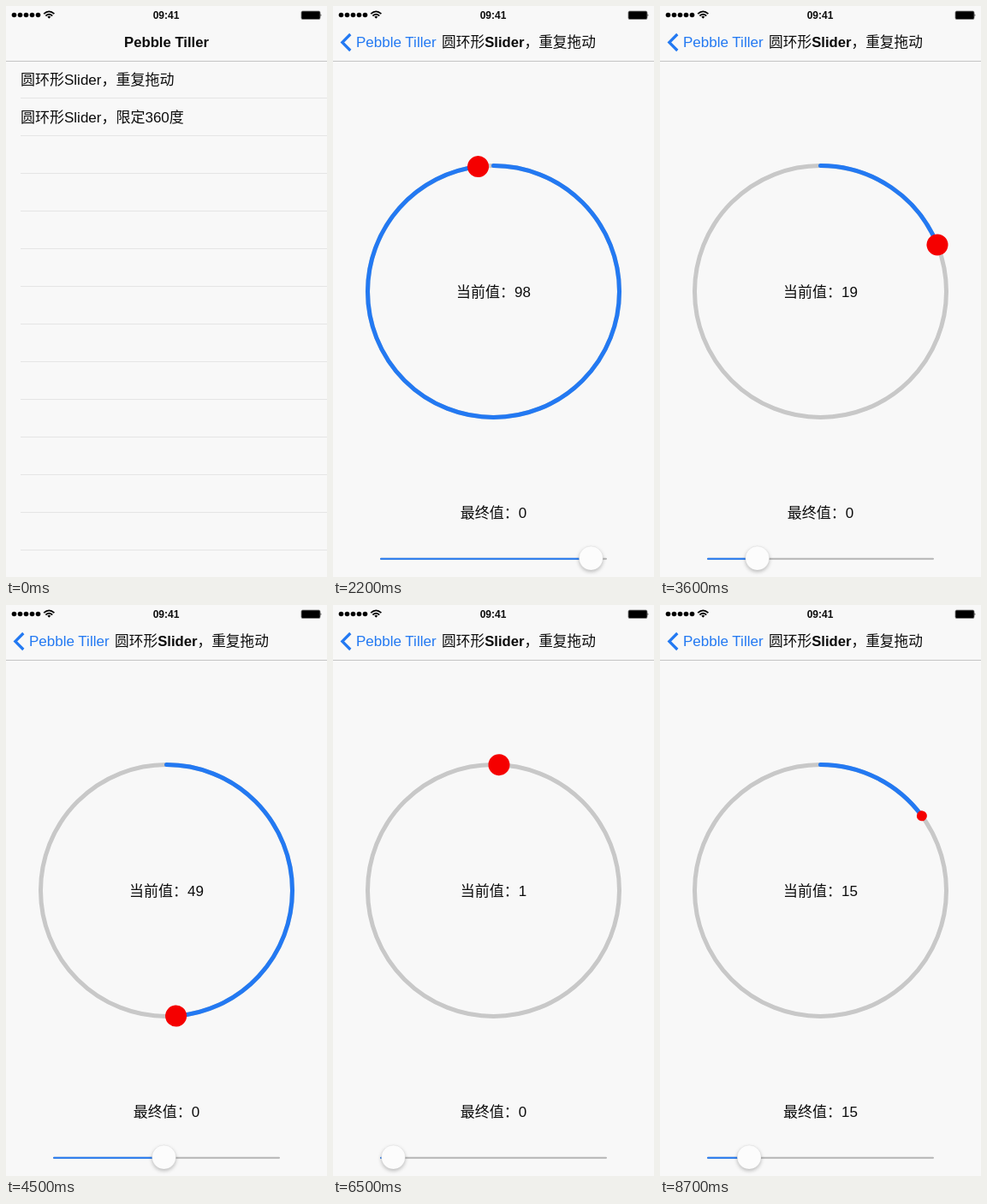
These frames come from a looping animation (375 px wide and 667 px high, 8800 ms). An HTML page:

```html
<!DOCTYPE html>
<html lang="zh-CN">
<head>
<meta charset="utf-8">
<title>Pebble Tiller</title>
<style>
  html, body { margin: 0; width: 100%; height: 100%; overflow: hidden; background: #f8f8f8; }
  svg { display: block; width: 375px; height: 667px; }
  text { font: 17px "Liberation Sans", "Noto Sans CJK SC", "Noto Sans CJK", sans-serif; fill: #0c0c0c; }
  .mid { text-anchor: middle; }
  .title { font-size: 16.7px; font-weight: 500; }
  .bold { font-weight: bold; }
  .clock { font-size: 12px; font-weight: bold; }
  .bg { fill: #f8f8f8; }
  .line { fill: none; stroke-linecap: round; }
  .blue { stroke: #2379f2; }
  .grey { stroke: #c8c8c8; }
  #backLabel { fill: #2379f2; }
  #thumb { fill: #fcfcfc; stroke: rgba(0,0,0,.06); filter: drop-shadow(0 2px 2px rgba(0,0,0,.24)); }
</style>
</head>
<body>
<svg viewBox="0 0 375 667">
  <rect class="bg" width="375" height="667"/>

  <g id="list">
    <rect id="highlight" y="64" width="375" height="44" fill="#d9d9d9"/>
    <g id="rules" stroke="#e5e5e5"></g>
    <text x="17" y="92">圆环形Slider，重复拖动</text>
    <text x="17" y="136">圆环形Slider，限定360度</text>
  </g>
  <rect id="dim" width="375" height="667"/>

  <g id="detail">
    <rect class="bg" width="375" height="667"/>
    <circle class="line grey" cx="187.5" cy="333.5" r="147" stroke-width="5"/>
    <circle id="arc" class="line blue" cx="187.5" cy="333.5" r="147" stroke-width="5"
            pathLength="100" transform="rotate(-90 187.5 333.5)"/>
    <circle id="knob" cx="187.5" cy="186.5" fill="#f50000"/>
    <text id="current" class="mid" x="187.5" y="339.5"></text>
    <text id="final" class="mid" x="187.5" y="598"></text>
    <path class="line" d="M56 645.7H319" stroke="#b5b5b5" stroke-width="2"/>
    <path id="track" class="line blue" stroke-width="2"/>
    <circle id="thumb" cy="645" r="14"/>
  </g>

  <rect class="bg" width="375" height="64"/>
  <path d="M0 64.5H375" stroke="#c4c4c4"/>
  <text id="homeTitle" class="mid title bold" x="187.5" y="48">Pebble Tiller</text>
  <g id="back">
    <path d="M20.3 33L10.8 42.5L20.3 52" fill="none" class="blue" stroke-width="3.2"/>
    <text id="backLabel" x="27" y="48">Pebble Tiller</text>
  </g>
  <text id="detailTitle" class="mid title" x="217" y="48">圆环形<tspan class="bold">Slider</tspan>，重复拖动</text>

  <g id="signal"></g>
  <g fill="none" stroke="#000" stroke-width="1.7">
    <path d="M44.2 9.2Q50.3 3.6 56.4 9.2M46.4 11.5Q50.3 8 54.2 11.5"/>
    <path d="M48.3 12.6Q50.3 11 52.3 12.6L50.3 14.8Z" fill="#000" stroke="none"/>
  </g>
  <text class="mid clock" x="187" y="15">09:41</text>
  <rect x="345" y="6" width="22" height="9.5" rx="1.6" stroke="#777" stroke-width=".8"/>
  <path d="M367.6 9q1.6 1.7 0 3.5z"/>
</svg>

<script>
  const LOOP = 8800, STEP = 100;
  const TOUCH = 1200, RELEASE = 8700;
  const $ = id => document.getElementById(id);
  const set = (id, attrs) => {
    for (const name in attrs) $(id).setAttribute(name, attrs[name]);
  };

  // Drag position in percent of a turn, counted across full turns.
  const drag = [
    [1300, 0], [1700, 6], [2100, 0], [2200, -1.95], [2500, -6], [3000, 0],
    [3600, 18.95], [4500, 48.8], [6500, 100.7], [7700, 111.1], [8600, 114.9]
  ];
  const push = [[600, 0], [700, .22], [800, .72], [900, .94], [1000, 1]];

  function sample(keys, t) {
    if (t <= keys[0][0]) return keys[0][1];
    const i = keys.findIndex(key => key[0] >= t);
    if (i < 0) return keys[keys.length - 1][1];
    const [t0, a] = keys[i - 1], [t1, b] = keys[i];
    return a + (b - a) * (t - t0) / (t1 - t0);
  }

  function drawPush(p) {
    const shift = x => `translate(${x} 0)`;
    set('list', { transform: shift(-112 * p) });
    set('dim', { opacity: p * .1 });
    set('highlight', { opacity: p > 0 ? 1 : 0 });
    set('detail', { transform: shift(375 * (1 - p)) });
    set('homeTitle', { transform: shift(-114 * p), opacity: 1 - p });
    set('back', { opacity: p });
    set('backLabel', { transform: shift(114 * (1 - p)) });
    set('detailTitle', { transform: shift(170 * (1 - p)), opacity: p });
  }

  function drawSlider(t) {
    const value = (sample(drag, t) + 100) % 100;
    const shown = Math.round(value);
    const x = 68.8 + 2.372 * value;
    const held = t >= TOUCH && t < RELEASE;
    set('arc', { 'stroke-dasharray': `${value} 200` });
    set('knob', { r: held ? 12.5 : 6, transform: `rotate(${value * 3.6} 187.5 333.5)` });
    set('track', { d: `M56 645.7H${x}` });
    set('thumb', { cx: x });
    $('current').textContent = `当前值：${shown}`;
    $('final').textContent = `最终值：${t >= RELEASE ? shown : 0}`;
  }

  function frame(now) {
    const t = Math.floor(now % LOOP / STEP) * STEP;
    drawPush(sample(push, t));
    drawSlider(t);
    requestAnimationFrame(frame);
  }

  $('rules').innerHTML = Array.from({ length: 13 }, (_, i) =>
    `<path d="M17 ${107.5 + i * 44}H375"/>`).join('');
  $('signal').innerHTML = Array.from({ length: 5 }, (_, i) =>
    `<circle cx="${9.5 + i * 7}" cy="10.5" r="2.8"/>`).join('');

  frame(performance.now());
</script>
</body>
</html>
```
